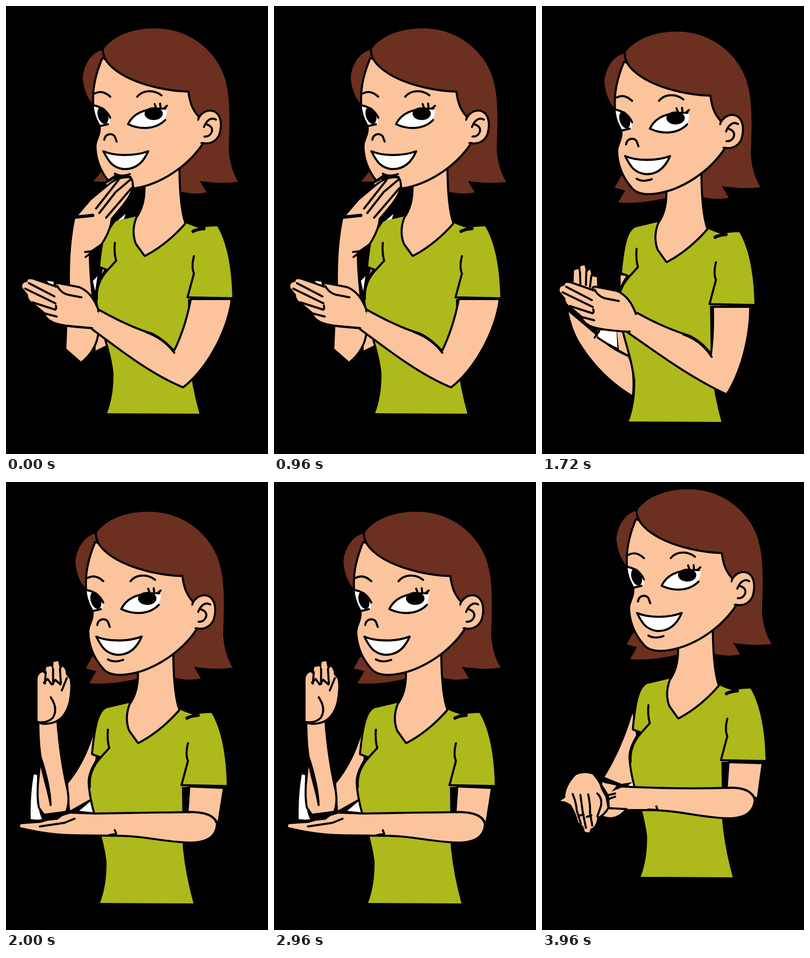
An HTML page for the animation above (4000 ms loop, 573 by 978 pixels).

```html
<!DOCTYPE html>
<html lang="en">
<head>
<meta charset="utf-8">
<title>Signing woman</title>
<style>
html, body { margin: 0; width: 100%; height: 100%; overflow: hidden; background: #000; }
svg { display: block; width: 100%; height: 100%; }
path, ellipse { stroke-linejoin: round; stroke-linecap: round; }
.skin, .hair, .shirt { stroke: #000; stroke-width: 9; paint-order: stroke; }
.skin { fill: #fcc49d; }
.hair { fill: #6b3020; }
.shirt { fill: #aeb91b; }
.plain { stroke: none; }
.white { fill: #fff; }
.line { fill: none; stroke: #000; stroke-width: 4.5; }
.bold { stroke-width: 7; }
.pose { display: none; }
</style>
</head>
<body>
<svg viewBox="0 0 573 978" preserveAspectRatio="none">
<defs>
  <g id="figure">
    <!-- hair behind the face -->
    <path class="hair" d="M212 96C235 62 285 48 328 49C400 50 455 95 476 150C492 195 489 250 487 315C489 340 496 366 508 384Q470 389 424 382L439 407Q408 413 378 404L372 340L220 150Z"/>
    <path class="hair" d="M212 96C185 100 167 135 168 160Q172 195 190 214L196 165L213 122Z"/>
    <!-- shirt and neck -->
    <path class="shirt" d="M290 458L235 471C218 480 212 510 206 568L222 574Q196 610 199 635C203 690 228 740 235 800Q236 850 221 889L423 890Q406 830 400 770L398 640L495 637C494 590 488 525 462 481Q440 481 424 485Q405 480 390 472Z"/>
    <path class="line" d="M411 546Q405 570 411 584L397 636L495 638M238 517Q236 540 241 556L221 578Q196 606 199 640"/>
    <path class="line bold" d="M409 492Q418 487 433 486"/>
    <path class="skin" d="M305 390Q307 435 287 463Q276 492 286 518L304 543Q350 519 390 474Q378 440 377 355L330 350Z"/>
    <!-- face -->
    <path class="skin" d="M212 116C198 150 191 180 193 215Q198 240 207 264C209 280 199 292 198 305C198 330 207 360 231 386C242 397 262 399 285 395C335 387 395 350 428 300L440 240L405 190L300 170Z"/>
    <path class="hair plain" d="M213 96C212 130 260 162 330 178Q365 186 398 186C402 212 408 226 420 240L450 234L476 150C455 95 400 50 328 49C285 48 235 62 213 96Z"/>
    <path class="line" d="M212 96C212 130 260 162 330 178Q365 186 399 187C402 212 408 226 420 240"/>
    <path class="skin" d="M423 246C432 230 449 226 460 236C470 247 469 266 464 281C457 295 443 301 427 296Z"/>
    <path class="plain skin" d="M412 258L430 242L434 293L420 302Z"/>
    <path class="line" d="M433 264C439 249 449 242 459 248M440 259C450 262 453 270 449 277Q444 286 434 285"/>
    <path class="line" d="M194 191Q211 182 228 198M287 198C300 182 325 183 340 195M215 292C217 279 231 276 238 285L242 296M238 366Q252 374 271 367"/>
    <!-- eyes -->
    <path class="white" d="M192 217Q219 222 228 243L227 258L208 262Q194 243 192 217Z"/>
    <ellipse cx="212" cy="239" rx="11" ry="19" transform="rotate(-18 212 239)"/>
    <path class="line" d="M192 217Q218 222 228 244M206 262L223 258"/>
    <path class="white" d="M267 258C279 232 308 221 352 224Q355 240 338 258C316 272 287 268 267 258Z"/>
    <ellipse cx="323" cy="235" rx="20" ry="14"/>
    <path class="line" d="M348 249C325 272 290 269 267 258C279 232 307 222 349 224M328 222L325 214M338 222L337 213M345 224L352 218"/>
    <!-- mouth -->
    <path class="white line" style="fill:#fff" d="M213 317C235 327 279 329 311 317C298 347 278 357 257 356C233 353 224 339 213 317Z"/>
  </g>
  <path id="nape" class="hair" d="M204 361L190 385L213 391L198 417Q245 421 303 407L304 380L230 350Z"/>
  <g id="flatHand">
    <path class="skin" d="M200 664C190 638 178 624 160 616L113 607Q106 608 112 616Q85 606 58 597Q46 594 47 602Q33 604 36 615L48 630Q48 642 60 648L84 668Q88 681 102 688Q120 697 187 701Z"/>
    <path class="line" d="M50 605L106 634M42 617L108 649M58 647L108 663Q111 660 109 654M84 671L111 678M112 611Q121 628 139 631L165 636"/>
  </g>
</defs>

<rect width="573" height="978"/>

<!-- fingers at the chin -->
<g class="pose">
  <path class="hair" d="M208 362L191 383L226 384L232 370Z"/>
  <path class="skin" d="M212 574L230 578L202 612Z"/>
  <path class="skin" d="M196 722L206 708L229 736L196 752Z"/>
  <use href="#figure"/>
  <path class="plain" d="M216 384L240 367L274 371L281 397L303 397L302 430L284 457L240 470L219 500Z"/>
  <path class="white" d="M219 388L236 378L226 397ZM244 469L261 454L258 465ZM190 600L200 590L195 622ZM89 600L104 602L104 616Z"/>
  <path class="skin" d="M151 465L186 424L226 391Q246 375 269 376Q276 379 275 395C270 420 247 441 229 464Q227 489 207 519L181 537Q181 580 188 640L200 712Q196 750 164 776L132 748L134 700L140 610Q138 530 151 465Z"/>
  <path class="line" d="M246 380L197 442M271 380L240 406L204 452M274 398L219 462"/>
  <path class="line bold" d="M152 461L190 457"/>
  <path class="line" d="M173 537L190 535M174 548L187 538"/>
  <path class="skin" d="M406 642L491 642C482 710 438 790 387 830C315 800 250 748 190 704L200 664C250 692 290 709 318 717Q345 730 368 757Q394 705 406 642Z"/>
  <use href="#flatHand"/>
  <path class="skin plain" d="M178 660L202 668L198 705L178 697Z"/>
  <path class="line" d="M132 698L187 703M306 712Q345 726 368 757"/>
</g>

<!-- palms together -->
<g class="pose">
  <path class="skin" d="M172 588L195 590L172 623Z"/>
  <path class="skin" d="M58 668Q66 705 80 730Q125 805 197 849Q201 793 188 766Q145 748 115 716Z"/>
  <path class="skin" d="M164 710L184 711L190 762L168 750Z"/>
  <path class="white" d="M122 708L163 709L165 750Q142 741 122 725Z"/>
  <path class="line" d="M115 724L125 710M122 724Q143 739 166 749"/>
  <g transform="matrix(1.003 0 0 1.013 -31.8 6.4)"><use href="#nape"/><use href="#figure"/></g>
  <path class="skin" d="M69 608L70 577L79 574L84 588L84 568L93 566L97 582L105 575L109 590L120 592L121 620Z"/>
  <path class="line" d="M83 580L84 606M97 578L96 609M108 588L105 613"/>
  <path class="skin" d="M376 659L453 659C453 725 432 800 403 845C320 806 250 753 189 711L207 672C250 696 290 712 322 722Q352 737 371 766Q378 715 376 659Z"/>
  <use href="#flatHand" x="3" y="8"/>
  <path class="skin plain" d="M180 668L207 675L201 712L180 704Z"/>
  <path class="line" d="M309 717Q348 730 371 766"/>
</g>

<!-- raised hand over a level forearm -->
<g class="pose">
  <path class="skin" d="M192 550Q172 615 136 658L140 717L188 690L196 600Z"/>
  <path class="white" d="M160 718L186 696L191 721Z"/>
  <g transform="matrix(1.012 0 0 1.0167 -18 15.2)"><use href="#nape"/><use href="#figure"/></g>
  <path class="white" d="M61 638Q53 680 54 736L80 738Q66 715 68 640Z"/>
  <path class="skin" d="M73 522Q73 570 78 600L72 660Q70 690 74 710L84 724L130 718Q138 696 131 667Q116 600 110 520Z"/>
  <path d="M68 575C76 640 89 665 96 708L100 706Q98 660 78 600Z"/>
  <path class="skin" d="M69 522L69 430Q70 418 80 415L86 420L88 404L99 402L103 411L104 393L114 391L118 410L124 403Q131 408 131 420L139 430Q143 446 137 480Q128 515 103 523Q84 529 69 522Z"/>
  <path class="line" d="M87 415L85 440M103 408L103 441M118 408L120 440M133 428L122 455M83 438L91 430L100 442L108 432L119 442M98 470Q115 496 102 515Q90 527 70 524"/>
  <path class="skin" d="M403 667L474 670L463 740L399 724Z"/>
  <path class="skin" d="M396 723Q450 721 459 746Q458 784 405 785C345 784 300 769 235 770L152 769Q95 769 30 753L32 747L76 744L140 724L195 726Q300 724 396 723Z"/>
  <path class="line" d="M64 740L112 735L134 718L165 722M74 752L128 744L150 735M225 771L241 768L238 760M397 668L396 718M397 721Q450 718 462 744"/>
</g>

<!-- hand brought down onto the wrist -->
<g class="pose">
  <path class="skin" d="M198 505Q176 580 137 644L174 659L200 655L196 610L207 560Z"/>
  <path class="white" d="M182 667L200 654L205 668Z"/>
  <g transform="matrix(.997 0 0 1.007 -4.5 -33.3)"><use href="#nape"/><use href="#figure"/></g>
  <path class="skin" d="M410 614L480 616L470 688L406 670Z"/>
  <path class="skin" d="M132 655L163 663L152 676L174 667Q300 673 400 670Q455 666 463 694Q460 731 410 732C350 731 300 714 235 714L182 714Q160 740 132 728Z"/>
  <path class="line" d="M122 645L137 655L188 664M143 684L160 680M143 693L160 687M146 712L185 714M232 715L253 716L250 708M404 615L402 666M402 668Q454 664 466 692"/>
  <path class="skin" d="M40 696L51 689Q50 666 74 640Q91 632 110 638Q126 655 129 670L139 688L143 711Q134 726 121 732Q118 754 107 756L103 765L94 764L90 751L80 744Q74 721 63 704L52 698Z"/>
  <path class="line" d="M67 681Q75 700 76 717L85 746M84 683L89 720L96 755M101 682Q106 704 105 722L110 750M121 680Q132 690 129 707L121 730M82 728L91 726M98 731L108 728M128 659L144 684L146 708"/>
</g>
</svg>
<script>
const POSE_MS = 1000;
const poses = [...document.querySelectorAll('.pose')];

function draw(now) {
  const current = Math.floor(now / POSE_MS) % poses.length;
  poses.forEach((pose, i) => { pose.style.display = i === current ? 'inline' : 'none'; });
  requestAnimationFrame(draw);
}
draw(0);
</script>
</body>
</html>
```
